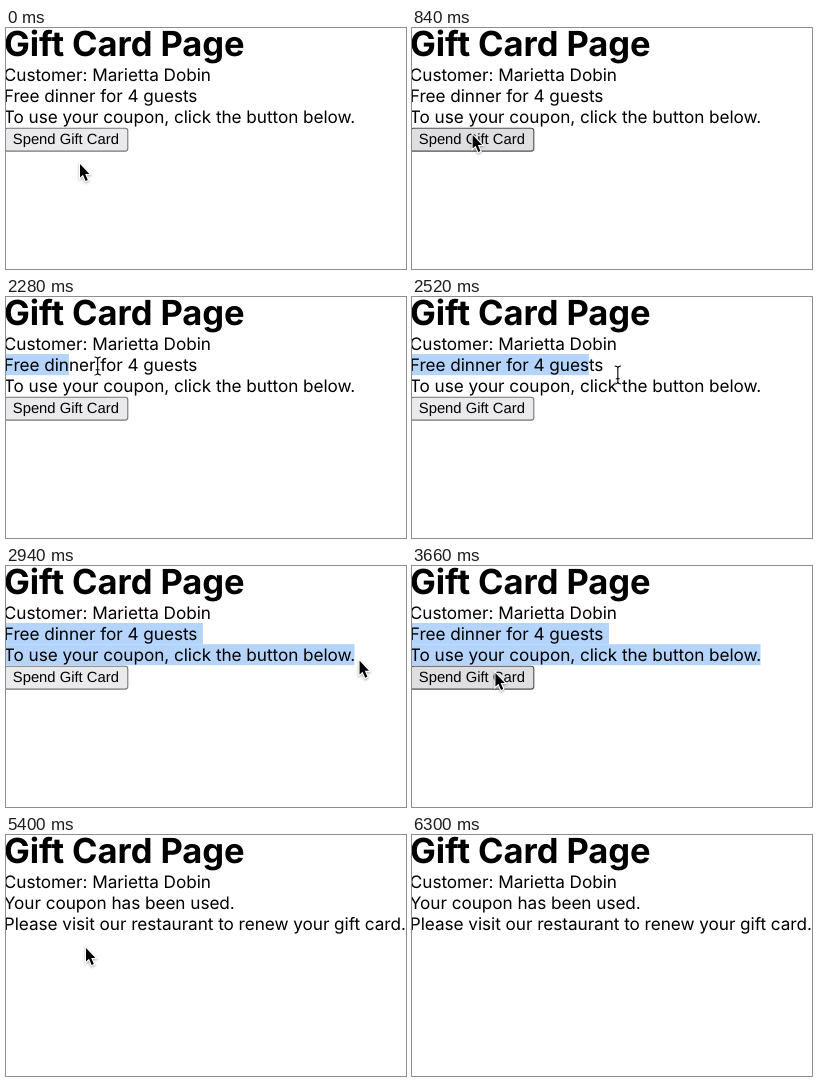
Recreate the animation shown at these times as an HTML page. Size 400 by 241 pixels, loop 6420 ms.

```html
<!DOCTYPE html>
<html lang="en">
<head>
<meta charset="utf-8">
<title>Gift Card Page</title>
<style>
  html, body { margin: 0; width: 100%; height: 100%; overflow: hidden; background: #fff; }
  svg { display: block; width: 400px; height: 241px; }
  text { font: 17.2px Inter, sans-serif; letter-spacing: -.05px; font-optical-sizing: none; text-rendering: geometricPrecision; }
  .title { font-size: 34.5px; font-weight: 700; letter-spacing: -.06px; }
  .highlight { fill: #b4d4fb; }
  #button text { font: 14.8px "Liberation Sans", Arial, sans-serif; letter-spacing: 0; }
  #arrow { filter: drop-shadow(0 1.2px 1px rgba(0, 0, 0, .35)); }
  #beam { fill: none; }
</style>
</head>
<body>
<svg viewBox="0 0 400 241">
  <defs><path id="beamShape" d="M-3.2-9Q0-9 0-6.5Q0-9 3.2-9M0-6.5V6.5M-3.2 9Q0 9 0 6.5Q0 9 3.2 9M-2 3.8H2"/></defs>
  <rect class="highlight" id="highlight1" x="-2.2" y="57" height="21.2"/>
  <rect class="highlight" id="highlight2" x="-2.2" y="78.2" height="21"/>
  <text class="title" x="-2" y="27.7">Gift Card Page</text>
  <text x="-2.2" y="52.8">Customer: Marietta Dobin</text>
  <text id="line1" x="-2.2" y="74"></text>
  <text id="line2" x="-2.2" y="95.1"></text>
  <g id="button">
    <rect id="face" x="-1.2" y="100.3" width="123" height="22.8" rx="2.6" stroke-width="1.1"/>
    <text x="6.8" y="116.1">Spend Gift Card</text>
  </g>
  <g id="arrow">
    <path d="M0 0V13.6L3 10.8L5.6 17L7.8 16L5.2 10H9.4Z" stroke="#fff" stroke-width="2.2" paint-order="stroke"/>
  </g>
  <g id="beam">
    <use href="#beamShape" stroke="#fff" stroke-opacity=".8" stroke-width="2.6"/>
    <use href="#beamShape" stroke="#000" stroke-width="1.1"/>
  </g>
</svg>
<script>
const LOOP = 6420, STEP = 60, LEFT = -2.2, LINE_TOP = 35.8, LINE_HEIGHT = 21.2;
const PRESS = 4200, REDEEMED = 4380, DESELECT = 5400, GONE = 6300;
const FIRST_END = 197, SECOND_END = 348.5, MESSAGE_END = 232;
const LINE_ENDS = [203, 192, SECOND_END];

const linear = p => p;
const easeIn = p => p * p;
const easeOut = power => p => 1 - (1 - p) ** power;

const move = (start, end, x, y, easeX, easeY = easeX) => ({ start, end, x, y, easeX, easeY });
const HOME = { x: 74, y: 136 };
const drag = move(2100, 2760, 320, 94, linear, easeIn);
const MOVES = [
  move(0, 480, 62, 107, easeOut(2)),
  move(780, 960, 58, 107, linear),
  move(1080, 1740, 6, 67, easeOut(3)),
  drag,
  move(2760, 3060, 360, 95, easeOut(2)),
  move(3180, 3900, 80, 113, easeOut(4), linear),
  move(5880, GONE, 57, 243, easeIn, linear)
];

const el = id => document.getElementById(id);
const [line1, line2, highlight1, highlight2, button, face, arrow, beam] =
  ["line1", "line2", "highlight1", "highlight2", "button", "face", "arrow", "beam"].map(el);
const show = (node, on) => node.setAttribute("visibility", on ? "visible" : "hidden");
const place = (node, { x, y }) => node.setAttribute("transform", `translate(${x} ${y})`);
const highlightTo = (rect, x) => rect.setAttribute("width", x - LEFT);
const write = (node, text) => { if (node.textContent !== text) node.textContent = text; };

function pointerAt(t) {
  let { x, y } = HOME;
  for (const m of MOVES) {
    const p = Math.min(1, Math.max(0, (t - m.start) / (m.end - m.start)));
    x += (m.x - x) * m.easeX(p);
    y += (m.y - y) * m.easeY(p);
  }
  return { x, y };
}

// Nearest gap between letters
function caretNear(text, x) {
  let caret = LEFT;
  for (let i = 0; i < text.getNumberOfChars(); i++) {
    const end = text.getEndPositionOfChar(i).x;
    if ((caret + end) / 2 > x) break;
    caret = end;
  }
  return caret;
}

// Right edges of the highlight on both lines
function selectionAt(t) {
  if (t >= REDEEMED) return [t < DESELECT ? MESSAGE_END : LEFT, LEFT];
  if (t > drag.end) return [FIRST_END, SECOND_END];
  if (t <= drag.start) return [LEFT, LEFT];
  const { x, y } = pointerAt(t - STEP); // the highlight trails the pointer
  return y < 78 ? [caretNear(line1, x), LEFT] : [FIRST_END, caretNear(line2, x)];
}

function drawButton(t, { x, y }) {
  const hover = x < 122 && y > 100 && y < 123.5;
  const [fill, stroke] = t >= PRESS ? ["#f5f5f5", "#8d8d8d"]
    : hover ? ["#dfdee0", "#505050"] : ["#eae9eb", "#767676"];
  face.setAttribute("fill", fill);
  face.setAttribute("stroke", stroke);
  show(button, t < REDEEMED);
}

function drawPointer(t, pointer) {
  const dragging = t > drag.start && t <= drag.end;
  const overText = pointer.x < LINE_ENDS[Math.floor((pointer.y - LINE_TOP) / LINE_HEIGHT)];
  const asBeam = dragging || overText;
  place(arrow, pointer);
  place(beam, pointer);
  show(arrow, !asBeam && t < GONE);
  show(beam, asBeam && t < GONE);
}

function draw(now) {
  const t = Math.floor(now % LOOP / STEP) * STEP;
  const used = t >= REDEEMED, pointer = pointerAt(t);
  write(line1, used ? "Your coupon has been used." : "Free dinner for 4 guests");
  write(line2, used ? "Please visit our restaurant to renew your gift card." : "To use your coupon, click the button below.");
  const [first, second] = selectionAt(t);
  highlightTo(highlight1, first);
  highlightTo(highlight2, second);
  drawButton(t, pointer);
  drawPointer(t, pointer);
}

const start = performance.now();
function tick() {
  draw(performance.now() - start);
  requestAnimationFrame(tick);
}
tick();
</script>
</body>
</html>
```
